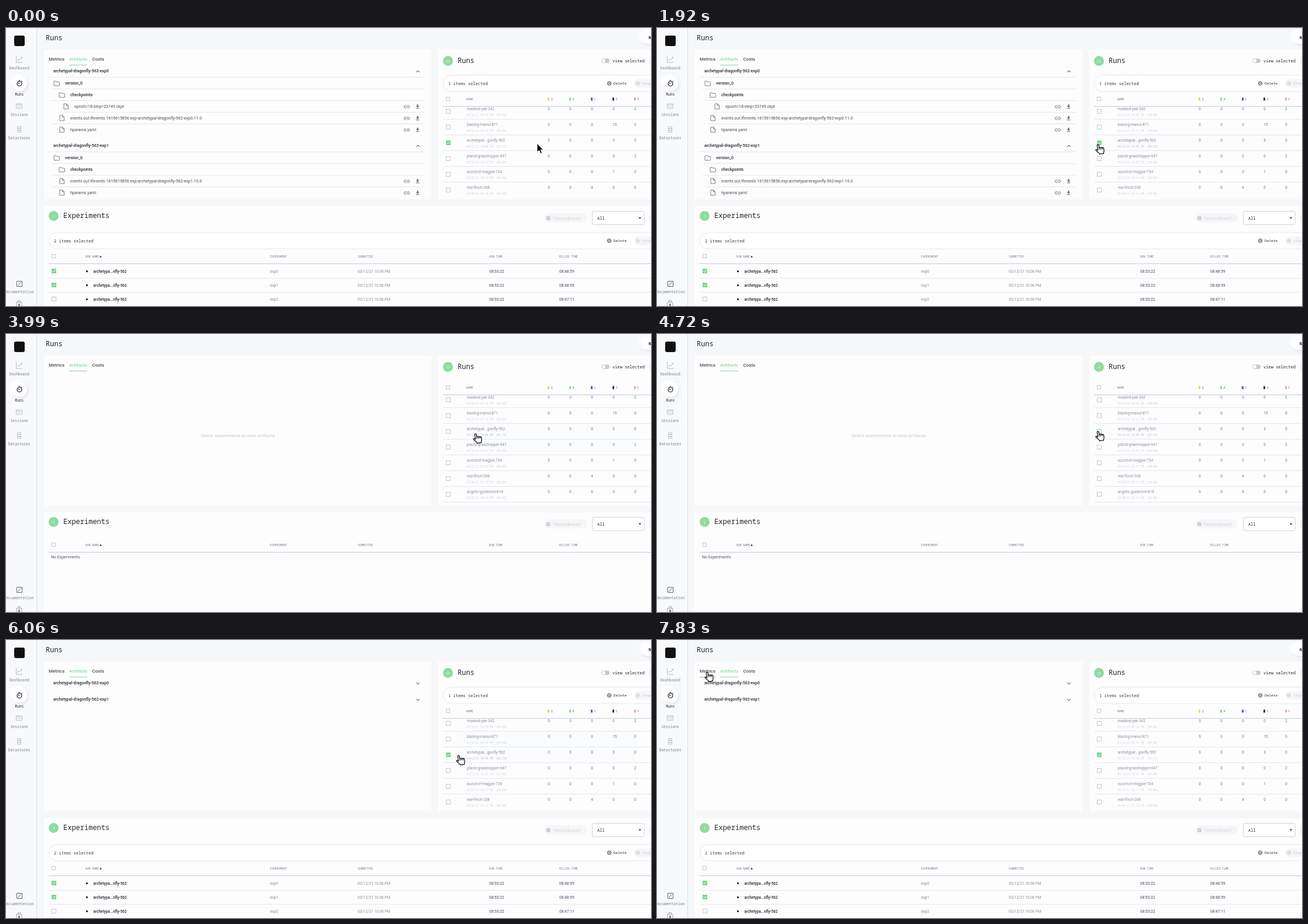
Animation of 1104 by 477 pixels, one loop 8 s. Source, as an HTML page:

```html
<!DOCTYPE html>
<html lang="en">
<head>
<meta charset="utf-8">
<title>Runs</title>
<style>
html, body { margin: 0; width: 100%; height: 100%; overflow: hidden; background: #f6f7f9; }
svg { display: block; }
text { font-family: Roboto, "Liberation Sans", sans-serif; white-space: pre; }
.m { font-family: "Noto Sans Mono", "Liberation Mono", monospace; }
</style>
</head>
<body>
<svg id="stage" width="1104" height="477" viewBox="0 0 1104 477">
  <defs>
    <clipPath id="runsClip"><rect x="740" y="37" width="364" height="253"/></clipPath>
    <filter id="soft" x="-50%" y="-50%" width="200%" height="200%">
      <feDropShadow dx="2" dy="2" stdDeviation="2.5" flood-color="#a0a8c0" flood-opacity=".28"/>
      <feDropShadow dx="-3" dy="-3" stdDeviation="1.5" flood-color="#fff"/>
    </filter>
  </defs>
  <g id="fixed"></g>
  <g id="live"></g>
</svg>
<script>
const LOOP = 8000, TICK = 147.8;
const INK = '#26262f', GREEN = '#8edba0', PANEL = '#fdfdfe', RULE = '#e6e7ec', ACCENT = '#c6c8de', HEAD = '#747682';

// Drawing helpers: each returns markup; y is the vertical middle of a text line
const text = (x, y, size, str, fill = INK, weight = 400, more = '') =>
  `<text x="${x}" y="${y + size * .36}" font-size="${size}" fill="${fill}" font-weight="${weight}" ${more}>${str}</text>`;
const mono = (x, y, size, str, fill, weight, more = '') => text(x, y, size, str, fill, weight, 'class="m" ' + more);
const rect = (x, y, w, h, fill, more = '') =>
  `<rect x="${x}" y="${y}" width="${w}" height="${h}" fill="${fill}" ${more}/>`;
const circle = (x, y, r, fill, more = '') => `<circle cx="${x}" cy="${y}" r="${r}" fill="${fill}" ${more}/>`;
const path = (d, x, y, stroke, width = 1, fill = 'none', more = '') =>
  `<path d="${d}" transform="translate(${x} ${y})${more}" stroke="${stroke}" stroke-width="${width}" fill="${fill}" stroke-linejoin="round"/>`;
const rule = (x, y, end, color = RULE) => rect(x, y - .5, end - x, 1, color);
const badge = (x, y, n) => circle(x, y, 8.5, GREEN) + mono(x, y, 6, n, '#e4f6e9', 400, 'text-anchor="middle"');

function checkbox(x, y, state) {
  const fill = { on: '#7ed492', fade: '#b9e6c4' }[state] || '#fff';
  const edge = state ? '#7ed492' : '#c6c7d0';
  return rect(x - 3.5, y - 3.5, 7, 7, fill, `stroke="${edge}"`) +
    (state === 'on' ? path('M-2.4 0L-.7 1.8L2.5 -1.7', x, y, '#fff') : '');
}
const headBox = (x, y) => rect(x - 3, y - 3, 6, 6, '#fff', 'stroke="#c6c7d0"');

const folder = (x, y) => path('M0 1Q0 0 1 0H3.6L4.8 1.4H8.6Q9.5 1.4 9.5 2.3V7Q9.5 8 8.5 8H1Q0 8 0 7Z', x, y - 3.5, '#6d6d7c', .9);
const file = (x, y) => path('M0 0H4.6L7.5 3V9H0ZM4.6 0V3H7.5', x, y - 4, '#6d6d7c', .9);
const chevron = (y, dir) => path(`M-2.8 ${1.4 * dir}L0 ${-1.4 * dir}L2.8 ${1.4 * dir}`, 705, y + .5, '#333');
const fileTools = y =>
  path('M-.8 -2.2H-2.4A2.2 2.2 0 0 0 -2.4 2.2H-.8M.8 -2.2H2.4A2.2 2.2 0 0 1 2.4 2.2H.8M-2 0H2', 686, y + 1, '#777780') +
  path('M-1 -3.5H1V-.8H3L0 2L-3 -.8H-1ZM-3 2.8H3V3.7H-3Z', 704.5, y + .5, 'none', 0, '#6a6a74');

function selectionBar(x, y, count) {
  return rect(x + .5, y - 14, 400 + 1104 - x, 28, '#fff', `rx="14" stroke="${RULE}"`) +
    mono(x + 9, y + .5, 7.05, count + ' items selected', '#3a3a44') +
    circle(1032.5, y, 3, 'none', 'stroke="#222"') + rule(1031, y, 1034, '#222') +
    mono(1040, y, 6.15, 'Delete', INK, 500) +
    rect(1075, y - 7.5, 60, 15, '#f5f6f8', 'rx="7.5"') +
    circle(1081.5, y, 3, 'none', 'stroke="#c6c8ce"') + rect(1080.5, y - 1, 2, 2, '#c6c8ce') +
    mono(1089, y, 6.15, 'Stop', '#c6c8ce');
}

function fixedParts() {
  const label = (y, str, fill = '#7c7e8a', weight = 400) => mono(22.7, y, 6.3, str, fill, weight, 'text-anchor="middle"');
  const gray = '#b8bbc6';
  return rect(0, 0, 52, 477, '#f8f9fb') + rect(52, 0, 1, 477, '#dde0e7') +
    rect(14, 13, 18, 18, '#111', 'rx="3"') +
    path('M-5 -6V5H6M-3 2L-1 -1L1 1L5 -4M3 -4H5V-2', 22.5, 54, gray) + label(69, 'Dashboard') +
    circle(23, 95, 13, '#fff', 'filter="url(#soft)"') +
    path('M-4 0A4 4 0 1 0 4 0A4 4 0 1 0 -4 0M-1.5 -5.5H1.5M0 .5L-2 -1.5M3.5 -3.5L4.5 -4.5', 23, 95.5, '#222', 1.2) +
    label(114, 'Runs', INK, 500) +
    path('M-5 -4H5V4H-5ZM-5 -2H5M-2 0L-3 1L-2 2M2 0L3 1L2 2M0 0V2', 22.5, 134, gray, .9) + label(149, 'Sessions') +
    path('M-3 -5H3V-2H-3ZM-3 -1.5H3V1.5H-3ZM-3 2H3V5H-3Z', 22.5, 174, gray, .9) + label(189, 'Datastores') +
    path('M-4.5 -4.5H4.5V4.5H-4.5ZM-2.5 3L2.5 -3', 23, 439, '#666') + label(453, 'Documentation') +
    path('M-4.5 -2H4.5V8H-4.5ZM-2 -2V-5H2V-2', 22.5, 472.5, '#a4a6ae') + rect(21, 473, 3, 4, '#85878f') +
    mono(68, 17, 12, 'Runs') +
    rect(1087, 6, 60, 21, '#fff', 'rx="10.5" filter="url(#soft)"') + mono(1100, 17, 6.5, 'New', INK, 600) +
    rect(65, 37, 663, 257, PANEL) + rect(740, 37, 364, 257, PANEL) + rect(65, 306, 1039, 171, PANEL) +
    text(108, 53.5, 8, 'Artifacts', GREEN, 500) + text(147.5, 53.5, 8, 'Costs', '#4c4c58', 500) +
    rule(108, 63.5, 139, '#9bcfa8') +
    badge(756.5, 56.4, 26) + mono(773, 56, 12, 'Runs') +
    rect(1019, 52.5, 14, 7.5, '#c6c8d4', 'rx="3.75"') + circle(1023, 56.2, 3, '#fff') +
    mono(1038, 56.5, 7.05, 'view selected') +
    rect(1101.5, 47, 40, 19, '#fff', 'rx="9.5" stroke="#dddfe6"') +
    mono(98, 322, 12, 'Experiments') +
    rect(922, 318, 72, 15.5, '#f5f6f8', 'rx="7.75"') + rect(925, 323, 6.5, 6.5, '#c9cbd3', 'rx="1"') +
    path('M-1.5 1.5L2 -2', 928.5, 326, '#f5f6f8') +
    mono(936, 326, 7.1, 'Tensorboard', '#cfd1d8') +
    rect(1003.5, 314.5, 89, 23, '#fff', 'rx="3" stroke="#d3d5de"') + mono(1012, 326.5, 7.05, 'All', '#33333d') +
    path('M-2.5 -1.2H2.5L0 1.5Z', 1085, 326, 'none', 0, '#333') +
    rect(1101.5, 317, 40, 19, '#fff', 'rx="9.5" stroke="#dddfe6"');
}

function artifacts(on, open) {
  if (!on) return text(333, 174, 8, 'Select experiments to view artifacts', '#c3c5cd');
  const group = (y, i) => {
    let out = text(81, y - .3, 6.9, 'archetypal-dragonfly-562-exp' + i, INK, 500) + chevron(y, open ? 1 : -1);
    if (!open) return out;
    const line = x => { out += rule(x, y + 10.5, 717); y += 20; };
    const branch = (x, name) => { out += folder(x, y + .5) + text(x + 19, y, 7, name, INK, 500); };
    const entry = (x, name) => { out += file(x, y) + text(x + 18, y, 7, name, '#4c4c56') + fileTools(y); };
    line(73);
    branch(82, 'version_0');
    line(78);
    branch(91, 'checkpoints');
    line(78);
    if (!i) {
      entry(99, 'epoch=18-step=23749.ckpt');
      line(98);
    }
    entry(92, `events.out.tfevents.1615615856.exp-archetypal-dragonfly-562-exp${i}.1${1 - i}.0`);
    line(78);
    entry(92, 'hparams.yaml');
    return out;
  };
  return group(74, 0) + group(open ? 202 : 102, 1);
}

// name, submitted, column with a count, the count
const RUNS = [
  ['masked-yak-342', '03/16/21 09:56 PM', 4, 2],
  ['blazing-manul-871', '03/12/21 03:15 PM', 3, 15],
  ['archetypal...gonfly-562', '03/12/21 10:06 PM', 3, 3],
  ['placid-grasshopper-647', '03/12/21 10:01 PM', 4, 2],
  ['succinct-magpie-734', '03/12/21 09:57 PM', 3, 1],
  ['real-finch-208', '03/09/21 05:31 PM', 2, 4],
  ['angelic-guillemot-818', '03/08/21 08:57 PM', 2, 6]];
const COLUMNS = [['Q', '#f8cd62'], ['R', '#7fdca0'], ['C', '#5a50ea'], ['S', '#33333b'], ['F', '#f0a0b4']];

function runsTable(n, on, mark) {
  const top = on ? 0 : -30, pointer = cursor(n);
  const rowAt = k => {
    const p = cursor(k);
    return p.hand && p.x > 745 ? Math.floor((p.y - 129 - top) / 27) : -1;
  };
  const warm = [n, n - 1, n - 2, n - 3].filter(k => k > 0).map(rowAt);
  let out = on ? selectionBar(748, 95, 1) : '';
  out += headBox(756.5, 121.5 + top) + mono(788, 122 + top, 4.8, 'NAME', HEAD, 500);
  COLUMNS.forEach(([letter, color], c) => {
    out += rect(927 + 37 * c, 119.5 + top, 3, 5, color) + mono(932.7 + 37 * c, 122 + top, 4.8, letter, HEAD);
  });
  RUNS.forEach(([name, date, column, count], i) => {
    const y = 139 + 27 * i + top;
    if (warm.includes(i)) out += rect(771, y - 9, 309, 26, '#fbfcfd');
    const near = pointer.hand && pointer.x > 745 && pointer.x < 754 && Math.abs(y + 4 - pointer.y) < 5;
    out += checkbox(757, y + 4, i === 2 && mark || (near ? 'hover' : '')) +
      text(788.5, y, 6.5, name, '#8f8fa0') +
      mono(788.5, y + 10.5, 4.42, date + `  (0${i === 2 ? '2:15' : '0:00'})`, rowAt(n) === i ? '#bcbdc7' : '#d3d4db');
    COLUMNS.forEach((_, c) => { out += text(927.3 + 37 * c, y, 6.3, c === column ? count : 0, '#74748a'); });
    out += rule(748, y + 17.5, 1104);
  });
  return `<g clip-path="url(#runsClip)">${out}${rule(748, 134.5 + top, 1104, ACCENT)}</g>`;
}

function experiments(on, mark) {
  const y = on ? 392 : 362;
  let out = badge(81.5, 322.4, on ? 3 : 0) + (on ? selectionBar(73, 365, 2) : '') + headBox(81.5, y - .5);
  [[136, 'RUN NAME'], [452, 'EXPERIMENT'], [602, 'SUBMITTED'], [827, 'RUN TIME'], [947, 'BILLED TIME']]
    .forEach(([x, str]) => { out += mono(x, y + .5, 4.8, str, HEAD, 500); });
  out += path('M-2 1.5L0 -1.5L2 1.5Z', 162, y, 'none', 0, '#333') + rule(73, y + 12.5, 1104, ACCENT);
  if (!on) return out + rule(73, 377, 134, '#eeeff3') + text(77, 382, 7, 'No Experiments', '#55555f');
  for (let i = 0; i < 3; i++) {
    const row = 418 + 24 * i;
    out += checkbox(82, row - 1, i < 2 ? mark : '') + rect(137, row - 2, 3, 3, '#333') +
      text(149.5, row, 6.4, 'archetypa...nfly-562', INK, 500) +
      text(452, row, 6.4, 'exp' + i, '#8a8a94') +
      text(602, row, 6.4, '03/12/21 10:06 PM', '#8a8a94') +
      text(827, row, 6.5, '08:53:22', '#6a6a80', 500) +
      text(947, row, 6.5, i < 2 ? '08:48:59' : '08:47:11', '#6a6a80', 500) +
      rule(73, row + 11.5, 1104);
  }
  return out;
}

// Pointer path: step, left, top
const PATH = [[0, 909, 198], [1, 900, 200], [4, 838, 204], [7, 753, 195], [11, 753, 195], [13, 751, 199],
  [19, 751, 199], [20, 753, 198], [25, 809, 176], [27, 800, 170], [32, 751, 166], [37, 751, 166], [41, 771, 197],
  [43, 803, 219], [45, 390, 114], [46, 269, 73], [48, 269, 73], [53, 82, 54], [60, 82, 54]];

function cursor(n) {
  const i = PATH.findIndex(p => p[0] > n), [a, x, y] = PATH[i - 1], [b, x2, y2] = PATH[i];
  const k = (n - a) / (b - a);
  return { x: x + (x2 - x) * k, y: y + (y2 - y) * k, hand: n > 0 && n !== 44 && n !== 45 };
}

function drawCursor({ x, y, hand }) {
  if (!hand) return path('M0 0V15L3.5 12L6 17.5L8.5 16.4L6 11H10.5Z', x, y, '#fff', 1, '#000');
  return path('M4.6 10.6V2.2a1.4 1.4 0 0 1 2.8 0V7a1.3 1.3 0 0 1 2.6 .3a1.3 1.3 0 0 1 2.6 .5a1.2 1.2 0 0 1 2.4 .6V12q0 2-1.3 4V17.3H6.5V16L1.5 10.3q-.6-1.5.8-1.7q1.2 0 2.3 2ZM7.4 7V9.5M10 7.3V9.8M12.6 7.8V10',
    x - 1.3, y, '#000', 1.2, '#fff', ' rotate(-8 8 9)');
}

function scene(n) {
  const on = n < 18 || n >= 35;
  const mark = n === 18 || n === 35 ? 'fade' : on ? 'on' : '';
  return text(73, 53.5, 8, 'Metrics', '#4c4c58', 500) + (n >= 53 ? rule(73, 63.5, 100, '#b9bac4') : '') +
    artifacts(on, n < 18) + runsTable(n, on, mark) + experiments(on, mark) + drawCursor(cursor(n));
}

const fixed = document.getElementById('fixed'), live = document.getElementById('live');
fixed.innerHTML = fixedParts();
let shown = -1;
function frame() {
  const n = Math.floor((performance.now() % LOOP + 12) / TICK);
  if (n !== shown) live.innerHTML = scene(shown = n);
  requestAnimationFrame(frame);
}
frame();
</script>
</body>
</html>
```
